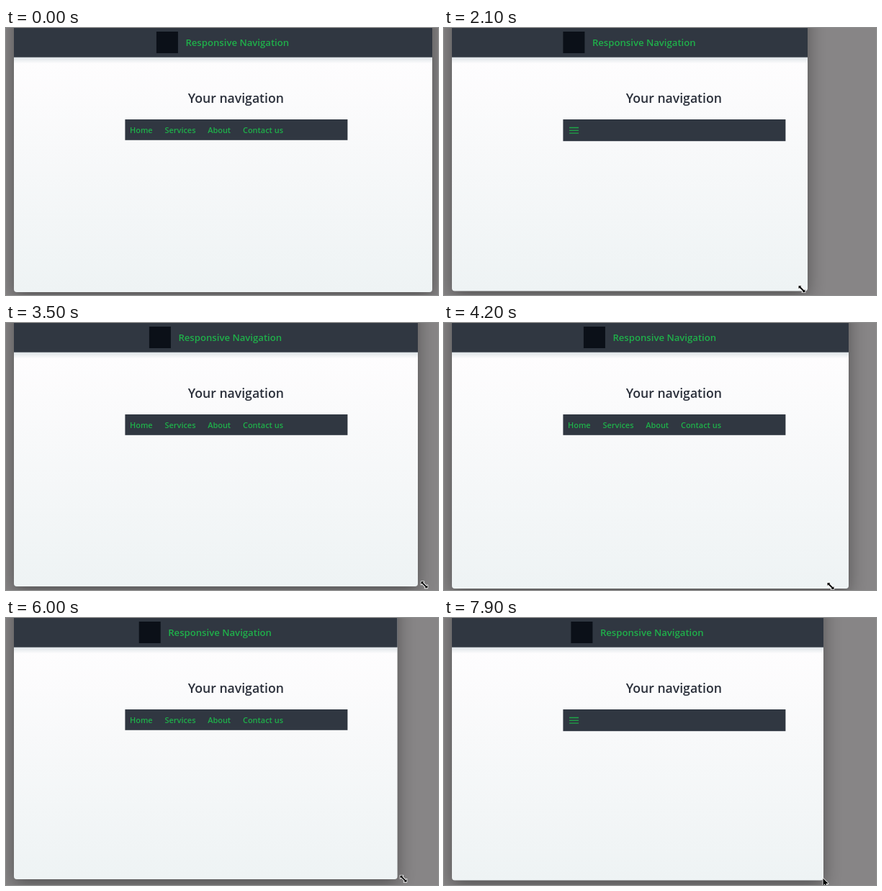
Animation of 600 by 371 pixels, one loop 8 s. Source, as an HTML page:

```html
<!DOCTYPE html>
<html lang="en">
<head>
<meta charset="utf-8">
<title>Responsive navigation</title>
<style>
  html, body { margin: 0; width: 100%; height: 100%; overflow: hidden; background: #878586; }
  svg { display: block; width: 600px; height: 371px; }
  text { font-family: "Open Sans", "Noto Sans", sans-serif; font-weight: 600; }
  .green { fill: #1fb04a; }
  .dark { fill: #303741; }
  .pointer path { fill: #000; stroke: #fff; stroke-width: 1.6; stroke-linejoin: round; paint-order: stroke; }
</style>
</head>
<body>
<svg viewBox="0 0 600 371" xmlns="http://www.w3.org/2000/svg">
  <defs>
    <linearGradient id="paper" x1="0" y1="0" x2="0" y2="1">
      <stop offset=".14" stop-color="#fefdfe"/>
      <stop offset=".45" stop-color="#f8f9fa"/>
      <stop offset="1" stop-color="#eef3f4"/>
    </linearGradient>
    <linearGradient id="fade" x1="0" y1="0" x2="0" y2="1">
      <stop offset="0" stop-color="#7d98a3" stop-opacity=".26"/>
      <stop offset="1" stop-color="#7d98a3" stop-opacity="0"/>
    </linearGradient>
    <filter id="blur" filterUnits="userSpaceOnUse" x="-80" y="-80" width="800" height="560">
      <feGaussianBlur stdDeviation="12"/>
    </filter>
  </defs>
  <rect width="600" height="371" fill="#878586"/>
  <rect id="shadow" x="11" y="-40" fill="#000" opacity=".38" filter="url(#blur)"/>
  <rect id="page" x="11" y="-5" rx="4" fill="url(#paper)"/>
  <rect id="headerShade" x="11" y="40.5" height="9" fill="url(#fade)"/>
  <rect id="header" class="dark" x="11" y="0" height="40.7"/>
  <g id="brand">
    <rect y="5" width="30" height="30" fill="#0b1018"/>
    <text class="green" x="40.5" y="24.6" font-size="13.15">Responsive Navigation</text>
  </g>
  <text x="252.8" y="104.2" font-size="17.6" fill="#2a2f3a">Your navigation</text>
  <rect id="bar" class="dark" x="165.4" y="127" width="309"/>
  <g id="links" class="green" font-size="10.95">
    <text x="172" y="145.6">Home</text>
    <text x="220.5" y="145.6">Services</text>
    <text x="280.2" y="145.6">About</text>
    <text x="329" y="145.6">Contact us</text>
  </g>
  <path id="burger" d="M174 138.5h13M174 142.3h13M174 146.1h13" stroke="#1fa648" stroke-width="1.3"/>
  <g class="pointer">
    <path id="arrow" d="M0 0V10L2.4 7.9 4 11.6 5.6 10.9 4 7.4H7.2Z"/>
    <path id="resize" d="M-4.5-4.5H-.5L-1.8-3.2 3.2 1.8 4.5 .5V4.5H.5L1.8 3.2-3.2-1.8-4.5-.5Z"/>
  </g>
</svg>
<script>
const LOOP = 8000, STEP = 100, LAG = 200, LEFT = 11, BREAKPOINT = 540;
const $ = id => document.getElementById(id);
const set = (id, attrs) => {
  for (const [name, value] of Object.entries(attrs)) $(id).setAttribute(name, value);
};
const show = (id, visible) => set(id, { visibility: visible ? 'visible' : 'hidden' });

// Smooth curve through [time, value] points without overshoot.
function curve(points) {
  const secant = i => (points[i + 1][1] - points[i][1]) / (points[i + 1][0] - points[i][0]);
  const slopes = points.map((p, i) => {
    if (i === 0 || i === points.length - 1) return 0;
    const a = secant(i - 1), b = secant(i);
    return a * b <= 0 ? 0 : 2 * a * b / (a + b);
  });
  return t => {
    if (t <= points[0][0]) return points[0][1];
    const i = points.findIndex(p => p[0] > t) - 1;
    if (i < 0) return points[points.length - 1][1];
    const [t0, v0] = points[i], [t1, v1] = points[i + 1];
    const h = t1 - t0, u = (t - t0) / h, w = 1 - u;
    return v0 * w * w * (1 + 2 * u) + v1 * u * u * (3 - 2 * u)
      + h * u * w * (slopes[i] * w - slopes[i + 1] * u);
  };
}

const rightEdge = curve([
  [1000, 592], [1400, 565], [1800, 519], [2100, 505], [2300, 497], [2500, 495],
  [2900, 513], [3500, 572], [3700, 581], [3820, 585], [4000, 580], [4200, 562],
  [4400, 537], [4500, 528], [4900, 492], [5150, 493], [5400, 507], [5600, 525],
  [6300, 557], [6500, 570], [6720, 578], [6900, 576], [7100, 560], [7200, 546],
  [7400, 531], [7600, 527]
]);
const bottomEdge = curve([
  [1000, 367], [2100, 365.5], [3500, 366], [4200, 369], [4600, 367], [5400, 359],
  [5600, 359], [6300, 365.5], [7200, 365.5], [7500, 364.5]
]);
const enterX = curve([[200, 605], [800, 591]]);
const enterY = curve([[200, 330], [800, 364]]);

function drawPointer(t) {
  const resizing = t >= 900 && t < 7700;
  show('resize', resizing);
  show('arrow', !resizing && t > 0);
  const x = rightEdge(t + LAG), y = bottomEdge(t + LAG) - 2.8;
  set('resize', { transform: `translate(${x} ${y})` });
  set('arrow', { transform: t < 900
    ? `translate(${enterX(t)} ${enterY(t)})`
    : `translate(${x - 0.5} ${y})` });
}

function draw(t) {
  const right = rightEdge(t), bottom = bottomEdge(t), width = right - LEFT;
  const collapsed = right < BREAKPOINT;
  set('shadow', { width, height: bottom + 47 });
  set('page', { width, height: bottom + 5 });
  set('header', { width });
  set('headerShade', { width });
  set('brand', { transform: `translate(${(LEFT + right) / 2 - 92.6} 0)` });
  set('bar', { height: collapsed ? 30.2 : 28.8 });
  show('links', !collapsed);
  show('burger', collapsed);
  drawPointer(t);
}

const start = performance.now();
function tick() {
  const t = (performance.now() - start) % LOOP;
  draw(Math.floor(t / STEP) * STEP);
  requestAnimationFrame(tick);
}
tick();
</script>
</body>
</html>
```
